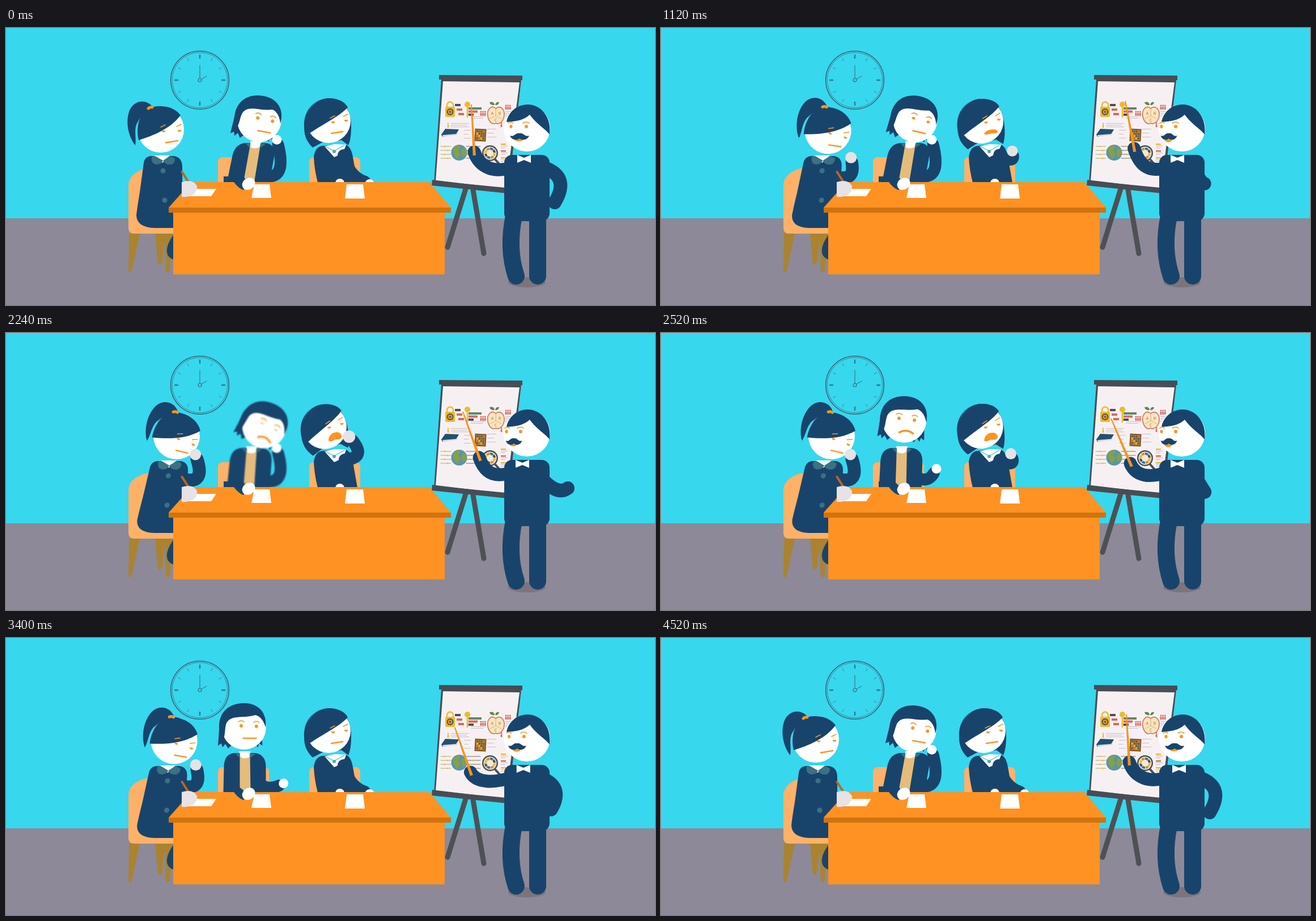
These frames come from a looping animation (1145 px wide and 489 px high, 4560 ms). An HTML page with a canvas:

```html
<!DOCTYPE html>
<html>
<head>
<meta charset="utf-8">
<style>
html, body { margin: 0; width: 100%; height: 100%; overflow: hidden; background: #37d7ee }
canvas { display: block; width: 100vw; height: 100vh }
</style>
</head>
<body>
<canvas id="stage" width="1145" height="489"></canvas>
<script>
const c = document.getElementById('stage').getContext('2d');
const LOOP = 4560, NAVY = '#18446c', ORANGE = '#fc9423', WHITE = '#fff', GREY = '#e6e2e6',
  TEAL = '#3b7183', FRAME = '#484c55', SEAT = '#ffb167', WOOD = '#a98331',
  RED = '#d9695b', YELLOW = '#efb92c', GREEN = '#5d8a67', SLATE = '#4a5055';

// Timing: ease runs 0 to 1 over [a, b]; pulse rises over [a, b] and falls over [d, e].
function ease(t, a, b) {
  const u = Math.min(1, Math.max(0, (t - a) / (b - a)));
  return u * u * (3 - 2 * u);
}
const pulse = (t, a, b, d, e) => ease(t, a, b) - ease(t, d, e);
const arch = p => Math.sin(Math.PI * p);
const mix = (a, b, p) => a.map((v, i) => v + (b[i] - v) * p);

// Drawing
function fill(d, color) { c.fillStyle = color; c.fill(new Path2D(d)); }
function stroke(d, w, color) {
  c.lineWidth = w; c.strokeStyle = color; c.lineCap = 'round';
  c.stroke(new Path2D(d));
}
function rect(x, y, w, h, color, r = 0) {
  c.fillStyle = color; c.beginPath(); c.roundRect(x, y, w, h, r); c.fill();
}
function oval(x, y, rx, ry, color) {
  c.fillStyle = color; c.beginPath(); c.ellipse(x, y, rx, ry, 0, 0, 7); c.fill();
}
const dot = (x, y, r, color) => oval(x, y, r, r, color);
function ring(r, w, color) {
  c.lineWidth = w; c.strokeStyle = color;
  c.beginPath(); c.arc(0, 0, r, 0, 7); c.stroke();
}
function at(x, y, deg, draw) {
  c.save(); c.translate(x, y); c.rotate(deg * Math.PI / 180); draw(); c.restore();
}
function lean(dx, k, base, draw) {
  c.save(); c.transform(1, 0, -k, 1, dx + k * base, 0); draw(); c.restore();
}
// Sleeve from shoulder over elbow to wrist, with an optional hand beyond the wrist.
function limb([sx, sy, ex, ey, wx, wy], w, handR, handColor) {
  stroke(`M${sx} ${sy}Q${ex} ${ey} ${wx} ${wy}`, w, NAVY);
  if (!handR) return;
  const d = Math.hypot(wx - ex, wy - ey);
  dot(wx + (wx - ex) / d * 9, wy + (wy - ey) / d * 9, handR, handColor);
}
function eye(x, y, open = 1) {
  oval(x, y, 3, .8 + 2.2 * open, ORANGE);
  stroke(`M${x - 5} ${y - 7}q5 -4 10 0`, 1.6, ORANGE);
}
function sleepyEye(x, y) {
  c.fillStyle = ORANGE; c.beginPath(); c.arc(x, y, 3.2, 0, Math.PI); c.fill();
  stroke(`M${x - 5} ${y - 6}l8 -4`, 1.6, ORANGE);
}

function clock() {
  at(342, 92, 0, () => {
    ring(51.3, 1.6, '#3a6576'); ring(48.8, .7, '#3a6576'); ring(3, 1.2, '#3a6576');
    for (let i = 0; i < 12; i++) at(0, 0, i * 30, () =>
      stroke('M0 -44V-39', i % 3 ? .8 : 2.4, '#33798c'));
    stroke('M0 -3V-26M3 -2L12 -7', 1, '#3a6576');
  });
}

function textLines(x, y, w, n, gap = 3) {
  for (let i = 0; i < n; i++) rect(x, y + i * gap, w - i % 2 * 4, 1, '#c9bfc2');
}
function person(x, y, color) {
  dot(x, y, 1.4, color); rect(x - 1.3, y + 2, 2.6, 5, color);
}
function padlockAndKey() {
  stroke('M778 140V136A5.5 5.5 0 0 1 789 136V140', 2.5, YELLOW);
  rect(775, 139, 17, 18, YELLOW, 2);
  [SLATE, ORANGE, TEAL].forEach((col, i) => dot(783.5, 148, 6 - 2 * i, col));
  dot(814, 135, 5, YELLOW);
  stroke('M814 139V157M814 153h3', 2.6, YELLOW);
  [SLATE, RED, GREEN].forEach((col, i) => {
    rect(792 + i * 3, 134 + i * 8, 10, 4, i < 2 ? col : RED);
    rect(816, 151 - i * 5.5, 9 + i * 7, 4, col);
  });
  textLines(820, 156, 26, 2);
}
function apple() {
  const d = 'M864 142C855 134 848 146 850 156C852 167 859 171 864 168C870 171 878 165 879 154C880 143 872 136 864 142Z';
  fill(d, '#f6e6bd'); stroke(d, 1.6, '#d8705f');
  stroke('M864 142V155l-10 5M864 155l10 5', .8, '#d8a078');
  fill('M862 136Q854 137 853 131Q861 129 862 136ZM863 136Q864 130 870 131Q869 137 863 136Z', '#5c8a4d');
  c.fillStyle = '#c9614f'; c.font = '7px "Open Sans", sans-serif'; c.textAlign = 'center';
  c.fillText('A', 858, 153); c.fillText('B', 871, 153); c.fillText('C', 864, 165);
  for (let i = 0; i < 3; i++) { person(838 + i * 3.6, 148, RED); person(882 + i * 3.6, 137, RED); }
  textLines(881, 147, 14, 4);
}
function bookAndChip() {
  fill('M768 188L775 178L799 179L794 188L770 192Z', '#24506f');
  fill('M770 189L794 187L797 183L796 189L771 192Z', '#d8dde0');
  person(780, 169, YELLOW); person(874, 168, RED);
  textLines(785, 168, 32, 3); textLines(808, 180, 12, 3, 7); textLines(849, 178, 16, 3, 7);
  at(837, 189, 3, () => {
    rect(-10, -11, 20, 22, '#7d5629'); rect(-8, -9, 16, 18, '#b5822f');
    for (let i = 0; i < 16; i++)
      rect(-7 + i % 4 * 3.7, -8 + (i >> 2) * 4.1, 2.7, 3, ['#71513a', RED, TEAL, YELLOW][i * 7 % 5 % 4]);
  });
}
function globeAndLens() {
  for (let y = 209, i = 0; i < 4; i++, y += 7) {
    stroke(`M767 ${y}h18`, .9, '#a5a35b'); dot(774 + i % 2 * 5, y, 1.3, YELLOW);
    stroke(`M812 ${y}h25`, .9, '#655a58'); dot(822 + i % 2 * 6, y, 1.3, YELLOW);
  }
  dot(799.5, 220, 14, '#5c94a8');
  fill('M789 212Q796 204 802 209L798 216L802 223L796 231Q788 224 789 212ZM806 212L812 214L813 223L806 228L803 220Z', '#84a04d');
  stroke('M863 232L872 242', 4, SLATE);
  dot(854, 221, 14, SLATE); dot(854, 221, 11.5, '#f0ead8');
  c.lineCap = 'butt'; c.lineWidth = 4;
  for (let i = 0; i < 8; i++) {
    c.strokeStyle = [YELLOW, '#d98740', TEAL, SLATE][i % 4];
    c.beginPath(); c.arc(854, 221, 8, i * .785, i * .785 + .68); c.stroke();
  }
  for (let i = 0; i < 3; i++) {
    rect(873, 204 + i * 12, 9, 2.5, i % 2 ? RED : YELLOW);
    textLines(873, 208 + i * 12, 12, 2);
  }
}
function board() {
  stroke('M811 284L779 387M824 286L843 398', 9, '#4d5154');
  fill('M768 90L909 92L886 288L755 274Z', FRAME);
  fill('M771 94L906 96L882 282L758 270Z', '#f7f0f3');
  fill('M764 83L911 84V92L764 91Z', FRAME);
  fill('M752 268L885 284V292L751 278Z', FRAME);
  padlockAndKey(); apple(); bookAndChip(); globeAndLens();
}

function presenter(t) {
  const turn = pulse(t, 200, 520, 3200, 3560);
  const tuck = pulse(t, 100, 520, 3220, 3480);
  const gesture = pulse(t, 900, 1500, 2240, 2720);
  const drop = ease(t, 1750, 2240);
  const onHip = [948, 246, 996, 262, 968, 308], hidden = [942, 255, 945, 270, 940, 285];
  const waving = [950, 262, 975, 286, 1001 - 10 * drop + 10 * arch(ease(t, 1560, 2240)), 251 + 23 * drop];

  // stick tip and hand visit four spots on the board
  const home = [821, 135, 826, 219];
  let stick = mix(home, [817, 122, 844, 206], ease(t, 700, 1560));
  stick = mix(stick, [806, 139, 835, 220], ease(t, 1600, 2240));
  stick = mix(stick, [772, 173, 815, 249], ease(t, 2280, 2880));
  const [tx, ty, hx, hy] = mix(stick, home, ease(t, 2900, 4050));

  oval(919, 449, 33, 9, '#7c747d');
  stroke('M896 332Q884 390 900 438M938 330V438', 30, NAVY);
  limb(mix(mix(onHip, hidden, tuck), waving, gesture), 24);
  rect(879, 224, 80, 117, NAVY, 14);

  at(919, 177, 0, () => {
    dot(0, 0, 41, WHITE);
    fill('M-36 -11C-33 -28 -18 -42 1 -42C26 -42 44 -18 40 11C34 2 18 -6 5 -24C-7 -13 -22 -12 -36 -11Z', NAVY);
    c.translate(-10 * turn, 0);
    oval(-28 + 2 * turn, -3, 2.6, 3, ORANGE); oval(-1, -3, 3, 3, ORANGE);
    stroke(`M${-33 + 4 * turn} -9q5 -4 8 0M-7 -9q6 -4 11 0`, 1.6, ORANGE);
    oval(-14, 19, 8 - turn, 4 + turn + Math.sin(t / 130) * turn, ORANGE);
    c.translate(-13, 14); c.scale(1 - .15 * turn, 1);
    fill('M0 -5C7 -7 9 2 17 -1C14 7 5 8 0 4C-5 8 -14 7 -17 -1C-9 2 -7 -7 0 -5Z', NAVY);
  });
  at(914 - 3 * turn, 231, 0, () => fill('M0 -2L-12 -7V7L0 2L12 7V-7Z', WHITE));

  stroke(`M892 246C863 256 ${hx + 10} ${248 + (hy - 219) * .5} ${hx} ${hy}`, 23, NAVY);
  const angle = Math.atan2(hy - ty, hx - tx) * 180 / Math.PI, len = Math.hypot(hx - tx, hy - ty) + 6;
  at(tx, ty, angle, () => fill(`M0 -1L${len} -2.6V2.6L0 1Z`, '#f5941f'));
}

function writer(t) {
  const doze = pulse(t, 720, 1300, 3150, 4160);
  fill('M216 276Q217 264 228 256Q240 248 256 246L300 262V363H226Q216 363 216 352Z', SEAT);
  fill('M217 363H236L222 428Q219 435 216 428ZM263 363H281L275 415Q271 422 268 415ZM279 363H294L289 428Q285 435 282 428Z', WOOD);
  fill('M298 362C286 376 274 402 296 409Z', NAVY);

  at(273 + 28 * doze, 179 + 3 * doze, 23 * doze, () => {
    fill('M-13 -38C-23 -54 -48 -54 -56 -31C-63 -9 -55 16 -45 28C-42 16 -49 -2 -40 -14C-34 -26 -26 -30 -13 -38Z', NAVY);
    dot(0, 0, 41, WHITE);
    fill('M-39 19C-47 -19 -28 -41 -3 -41C17 -42 29 -33 35 -25C17 -1 -13 11 -39 19Z', NAVY);
    stroke('M-22 -37Q-19 -40 -15 -39', 5, ORANGE);
    sleepyEye(5, 2); sleepyEye(33, 1);
    stroke('M9 23.5L30 20', 2.4, ORANGE);
  });
  limb(mix([300, 276, 312, 285, 336, 287], [312, 258, 352, 268, 337, 223], doze), 20 + 3 * doze, 10, GREY);
  lean(0, .1 * doze, 345, () => {
    fill('M243 238Q245 226 257 226H296Q311 228 311 246V300L304 353H262Q231 352 230 331Q231 320 236 290Z', NAVY);
    fill('M261 225H289L276 238Z', WHITE);
    fill('M257 227Q255 240 266 241Q275 240 277 234L263 226ZM289 226L277 234Q281 242 291 241Q299 239 298 230Z', TEAL);
    dot(277, 252, 4.5, TEAL); dot(280, 304, 4.5, TEAL);
  });
}

function listener(t) {
  const nod = pulse(t, 700, 2240, 2240, 2600);
  const wake = pulse(t, 2240, 2700, 3750, 4450);
  const turn = pulse(t, 3200, 3600, 3850, 4400);
  const open = 1 - pulse(t, 900, 1500, 2240, 2500);
  const frown = pulse(t, 1800, 2240, 2450, 2750);
  const blur = pulse(t, 2120, 2240, 2240, 2420);
  const slump = 1 - wake, look = 14 - 3 * nod - 11 * wake + 18 * turn;
  const prop = [464, 262, 494, 262, 480, 206 + 6 * frown];
  const flat = [445, 250, 458, 268, 482, 266], lift = [448, 262, 464, 272, 481, 255];

  rect(374, 228, 90, 60, SEAT, 8);
  if (blur > .1) c.filter = `blur(${blur * .8}px)`;
  lean(8 * slump + 3 * turn, (.18 - .1 * frown) * slump, 272, () => {
    fill('M383 226Q384 203 404 203H437Q457 205 457 228V275H396L382 272Z', NAVY);
    fill('M411 207H429L430 273H420L411 264Z', '#e6bc7b');
    fill('M410 200H430L428 210Q420 215 412 210Z', WHITE);
    fill('M403 204L411 203V212ZM429 203L438 205L429 212Z', TEAL);
  });
  const pop = 6 * arch(ease(t, 2240, 2700));
  at(445 + 10 * nod - 27 * wake, 160 + 2 * nod - 4 * wake - pop, 10 + 14 * nod - 10 * wake, () => {
    const side = Math.min(look, 14), locks = 'L-44 34L-38 30L-36 37L-31 31L-26 39L-15 28V-10Z';
    fill('M-41 -8' + locks, NAVY);
    at(-side * .8, 0, 0, () => { c.scale(-1, 1); fill('M-41 -8' + locks, NAVY); });
    dot(side * .15, 2, 39, WHITE);
    fill('M-41 12C-47 -22 -27 -41 2 -41C29 -41 43 -22 40 2C37 -9 31 -18 22 -20C2 -14 -16 -20 -26 -10C-33 -4 -30 10 -34 22Z', NAVY);
    eye(look - 15, -1, open); eye(look * .9 + 13, 0, open);
    const w = 13 - look * .14;
    stroke(`M${look - w} ${21 + frown * 3}q${w} ${-9 * frown} ${2 * w} 0`, 2.6 + frown, ORANGE);
  });
  limb(mix(mix(prop, flat, wake), lift, turn), 21, 8.5, WHITE);
  c.filter = 'none';
}

function yawner(t) {
  const cover = pulse(t, 850, 1350, 2350, 2750);
  const yawn = pulse(t, 850, 1350, 2950, 3300);
  rect(535, 228, 90, 60, SEAT, 8);
  fill('M543 228Q545 210 558 208L600 206Q609 210 612 228L620 273H550Q544 250 543 228Z', NAVY);
  fill('M562 209L580 205L600 206Q596 222 579 228Z', WHITE);
  stroke('M563 209L579 217L597 207', 1.2, '#55bcc9'); dot(579, 218, 3, '#55a5b5');
  at(568 - 7 * cover, 164 + 2 * cover, -9 * cover, () => {
    fill('M-42 11C-44 -24 -18 -40 2 -40C27 -40 42 -19 41 11C41 26 39 36 36 43L24 34L-10 38L-27 47C-38 36 -42 26 -42 11Z', NAVY);
    dot(1, 0, 39, WHITE);
    fill('M-40 21C-46 -14 -23 -40 2 -40C17 -40 30 -34 35 -24C22 -9 -8 5 -34 23Z', NAVY);
    sleepyEye(9, 1); sleepyEye(32, -2);
    if (yawn < .1) return stroke('M6 22L26 19', 2.4, ORANGE);
    c.translate(16, 20); c.scale(1, yawn);
    fill('M-12 5C-10 -8 8 -12 12 -2C14 6 6 6 2 5C-4 4 -7 10 -12 5Z', ORANGE);
  });
  limb(mix([596, 225, 604, 262, 633, 272], [598, 224, 636, 220, 611, 190], cover), 22,
    8 + 3 * cover, cover > .5 ? GREY : WHITE);
  dot(589, 274, 8, WHITE);
}

function table() {
  fill('M327 272H747L785 317H287Z', '#ff9223');
  rect(287, 317, 498, 9, '#d0730f');
  rect(295, 326, 479, 109, '#ff9223');
  fill('M438 276H465L468 300H433ZM601 276H630L633 301H598ZM336 284H371L362 297H316Z', WHITE);
  fill('M384 262H410L428 276L419 286Q410 283 402 272H384Z', NAVY);
  at(428, 275, -35, () => oval(0, 0, 12, 10, WHITE));
  stroke('M310.5 254L322 272', 4, '#c0651d');
  fill('M310 272Q330 266 337 279Q338 288 330 294Q322 299 310 298Z', GREY);
}

function frame(t) {
  rect(0, 0, 1145, 336, '#37d7ee');
  rect(0, 336, 1145, 153, '#8d8998');
  clock(); board(); presenter(t);
  writer(t); listener(t); yawner(t);
  table();
}
let start;
function tick(now) {
  start ??= now;
  frame(Math.max(0, now - start) % LOOP);
  requestAnimationFrame(tick);
}
requestAnimationFrame(tick);
</script>
</body>
</html>
```
